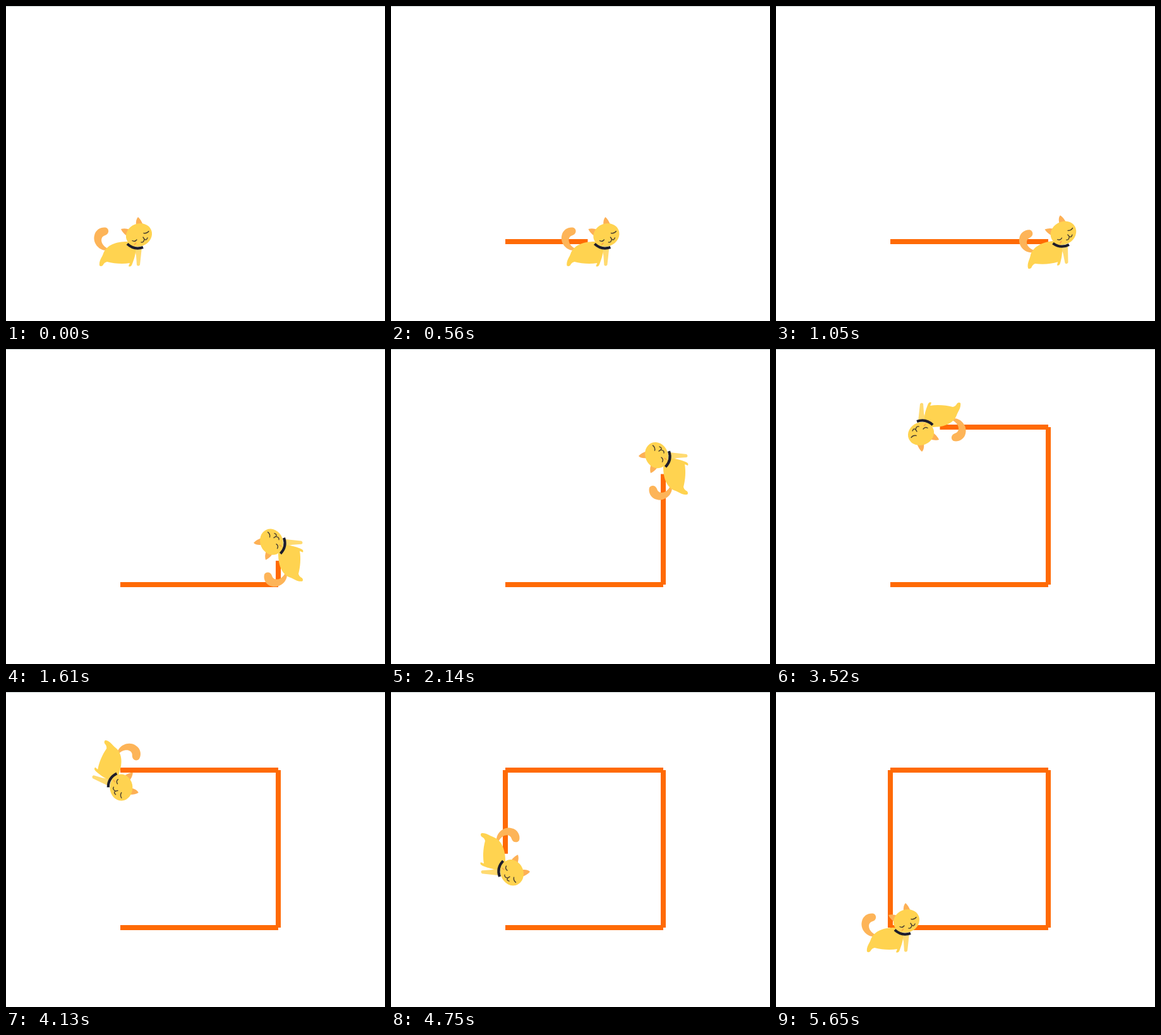
These frames come from a looping animation (600 by 500 pixels, 6.99 s). An HTML page:

```html
<!DOCTYPE html>
<html lang="en">
<head>
<meta charset="utf-8">
<title>Cat drawing a square</title>
<style>
  html, body { margin: 0; width: 100%; height: 100%; overflow: hidden; background: #fff; }
  svg { display: block; width: 600px; height: 500px; }
  #trail line { stroke: #ff6a05; stroke-width: 8; }
  .face { fill: none; stroke: #4a3f30; stroke-width: 1.4; stroke-linecap: round; }
</style>
</head>
<body>
<svg viewBox="0 0 600 500">
  <rect width="600" height="500" fill="#fff"/>
  <rect width="600" height="1" fill="#c6cfcf"/>
  <g id="trail"></g>
  <g id="cat">
    <g transform="translate(-185 -374)">
      <!-- tail -->
      <path fill="#fdb458" d="M159 388C146 388 137 375 140 364C142 354 152 350 159 352C164 355 163 362 157 364C150 366 150 373 153 378C155 381 158 384 162 385Z"/>
      <!-- far leg, body, near legs -->
      <path fill="#ffda70" d="M203 384L215 383C214 393 213 402 212 411Q209 414 207 411L206 396Z"/>
      <path fill="#ffd350" d="M148 412C147 404 152 399 154 393C159 379 175 374 192 374L205 382C206 391 204 399 200 409Q198 415 194 413L196 408C185 410 171 409 160 406C156 407 155 409 153 412Q150 414 148 412Z"/>
      <path fill="none" stroke="#1d1d2c" stroke-width="4.2" d="M192 377.500Q203 388 217 383"/>
      <!-- head -->
      <path fill="#fdb055" d="M206 348Q205 339 209 335Q214 339 217 348ZM182 354Q189 352 196 355L190 364Q184 359 182 354Z"/>
      <ellipse cx="210.5" cy="363.5" rx="21" ry="18" fill="#ffd350" transform="rotate(-22 210.5 363.5)"/>
      <path class="face" d="M200 372.500Q204 375 207 371M218 360.500Q223 361.500 226 357.500M217 367L219 370M219 370Q218 376 214 375M219 370Q222 373 224 368"/>
      <path fill="none" stroke="#ff9d45" stroke-width="1.5" d="M203 379L206 376"/>
    </g>
  </g>
</svg>
<script>
const LOOP = 6990;
const TRAIL_LAG = 17;
const CORNERS = [[181, 374], [431, 374], [431, 124], [181, 124], [181, 374]];

// [time in ms, sides walked, quarter turns made]
const STEPS = [
  [-17, 0, 0], [0, 0.016, 0], [700, 0.668, 0], [1015, 1, 0],
  [1447, 1, 1], [2410, 2, 1],
  [2843, 2, 2], [3805, 3, 2],
  [4220, 3, 3], [5186, 4, 3],
  [5640, 4, 4]
];

const cat = document.getElementById("cat");
const trail = document.getElementById("trail");
const sides = CORNERS.slice(1).map(() =>
  trail.appendChild(document.createElementNS("http://www.w3.org/2000/svg", "line")));

const mix = (a, b, k) => a + (b - a) * k;

function stateAt(time) {
  const next = STEPS.findIndex(step => step[0] > time);
  if (next < 0) return STEPS[STEPS.length - 1].slice(1);
  const a = STEPS[Math.max(0, next - 1)], b = STEPS[Math.max(1, next)];
  const k = Math.max(0, (time - a[0]) / (b[0] - a[0]));
  return [mix(a[1], b[1], k), mix(a[2], b[2], k)];
}

function pointOn(side, k) {
  const [a, b] = [CORNERS[side], CORNERS[side + 1]];
  return [mix(a[0], b[0], k), mix(a[1], b[1], k)];
}

function draw(time) {
  const [walked, turns] = stateAt(time);
  const side = Math.min(3, Math.floor(walked));
  const [x, y] = pointOn(side, walked - side);
  cat.setAttribute("transform", `translate(${x} ${y}) rotate(${-90 * turns})`);

  const [drawn] = stateAt(time - TRAIL_LAG);
  sides.forEach((line, i) => {
    const k = Math.min(1, Math.max(0, drawn - i));
    const [x1, y1] = CORNERS[i], [x2, y2] = pointOn(i, k);
    Object.entries({ x1, y1, x2, y2 }).forEach(([name, value]) => line.setAttribute(name, value));
  });
}

let start;
function tick(now) {
  start ??= now;
  draw((now - start) % LOOP);
  requestAnimationFrame(tick);
}
draw(0);
requestAnimationFrame(tick);
</script>
</body>
</html>
```
